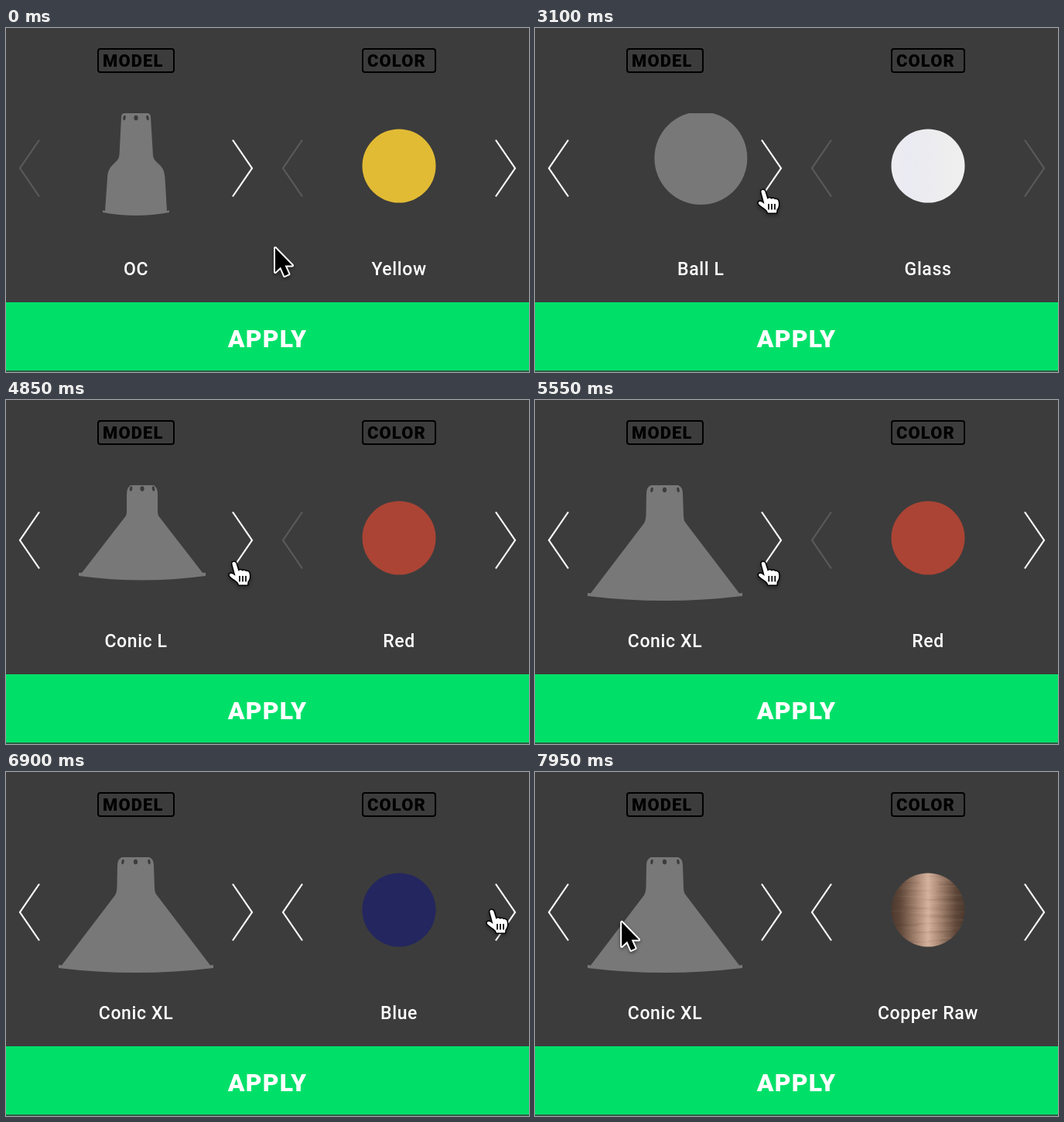
Recreate the animation shown at these times as an HTML page with a canvas. Size 676x444 px, loop 8000 ms.

```html
<!DOCTYPE html>
<html lang="en">
<head>
<meta charset="utf-8">
<title>Lamp picker</title>
<style>
  html, body { margin: 0; width: 100%; height: 100%; overflow: hidden; background: #3c3c3c; }
  canvas { display: block; }
</style>
</head>
<body>
<canvas id="stage" width="676" height="444"></canvas>
<script>
const ctx = document.getElementById('stage').getContext('2d');
const LOOP = 8000, SLIDE = 450, PANEL = 338;
const BG = '#3c3c3c', SHADE = '#787878', DIM = '#5a5a5a';
const modelClicks = [2845, 3758, 4408, 5055];
const colorClicks = [6397, 7139];
const rings = [[6340, 6540], [7080, 7240]];

// Cursor moves: start, end, target x, target y
const cursorStart = [348, 284];
const cursorMoves = [
  [1850, 2440, 294, 221],
  [2480, 2700, 295, 210],
  [5520, 6200, 628, 179],
  [7380, 7970, 112, 194]
];

const shade = (outline, holes, y) => ({ path: new Path2D(outline), holes, y });
const ball = (cy, r) => {
  const path = new Path2D();
  path.arc(168, cy, r, 0, Math.PI * 2);
  return { path, holes: [] };
};

const models = [
  { name: 'OC', ...shade(`M154 110H182Q187 110 187 115L190 164C191 176 205 174 205.500 194L208 236
    L211 235.500V238Q168 246 125 238V235.500L128 236L131 194C132 174 145 176 146.500 164L149 115Q149 110 154 110Z`,
    [153, 168, 183], 116) },
  { name: 'Ball L', ...ball(168, 60) },
  { name: 'Ball XL', ...ball(184, 77) },
  { name: 'Conic L', ...shade(`M161 110H191Q196 113 196 122V145Q196 149 199 152L254 223L258 223V227
    Q176 238 94 227V223L98 223L153 152Q156 149 156 145V122Q156 113 161 110Z`, [161.5, 176, 190.5], 114.5) },
  { name: 'Conic XL', ...shade(`M150 110H185Q191 112 191 121L192 149Q192 156 195 159L264 249.500L268 249V253
    Q168 265 68 253V249L72 249.500L141 159Q143 156 143.500 149L144 121Q144 112 150 110Z`, [151, 167.5, 185], 116) }
];

const acrossDisc = stops => {
  const g = ctx.createLinearGradient(460, 0, 556, 0);
  stops.forEach((c, i) => g.addColorStop(i / (stops.length - 1), c));
  return g;
};
const glass = { name: 'Glass', fill: acrossDisc(['#ececf0', '#eaeaf2', '#ececf0', '#eeeeee', '#efeff0']) };
const copper = {
  name: 'Copper Raw', brushed: true,
  fill: acrossDisc(['#4b382e', '#5f4739', '#876a58', '#b08e7a', '#d3b19d', '#b08e7a', '#876a58', '#5f4739', '#4b382e'])
};
const conicColors = [{ name: 'Red', fill: '#ab4435' }, { name: 'Blue', fill: '#24265f' }, copper];

const clamp = v => Math.min(1, Math.max(0, v));
const smooth = u => u * u * u * (u * (6 * u - 15) + 10);

// CSS "ease": cubic-bezier(.25, .1, .25, 1)
function ease(x) {
  if (x <= 0 || x >= 1) return clamp(x);
  const bezier = (a, b, s) => 3 * a * s * (1 - s) ** 2 + 3 * b * s * s * (1 - s) + s ** 3;
  let lo = 0, hi = 1;
  for (let i = 0; i < 24; i++) {
    const mid = (lo + hi) / 2;
    if (bezier(.25, .25, mid) < x) lo = mid; else hi = mid;
  }
  return bezier(.1, 1, lo);
}

const slidePosition = (clicks, t) => clicks.reduce((sum, at) => sum + ease((t - at) / SLIDE), 0);
const clickCount = (clicks, t) => clicks.filter(at => t >= at).length;

function text(str, x, y, font, color, spacing = 0, align = 'center') {
  ctx.font = `${font} Roboto, sans-serif`;
  ctx.letterSpacing = spacing + 'px';
  ctx.textAlign = align;
  ctx.fillStyle = color;
  ctx.fillText(str, x, y);
}

const caption = str => text(str, 0, 318.5, '500 23px', '#fff', .6);

function heading(str, x, width) {
  ctx.strokeStyle = '#000';
  ctx.lineWidth = 2;
  ctx.beginPath();
  ctx.roundRect(x + 1, 27, width - 2, 30, 3);
  ctx.stroke();
  text(str, x + 7, 50, '900 22px', '#000', 1.1, 'left');
}

function chevron(x, direction, active) {
  ctx.strokeStyle = active ? '#fff' : DIM;
  ctx.lineWidth = 2.2;
  ctx.beginPath();
  ctx.moveTo(x, 144.5);
  ctx.lineTo(x + 25 * direction, 181);
  ctx.lineTo(x, 217.5);
  ctx.stroke();
}

function drawModel(model) {
  ctx.fillStyle = SHADE;
  ctx.fill(model.path);
  ctx.fillStyle = BG;
  model.holes.forEach((x, i) => {
    ctx.beginPath();
    ctx.ellipse(x, model.y, i === 1 ? 2.6 : 1.7, 3.2, (1 - i) * .15, 0, Math.PI * 2);
    ctx.fill();
  });
  ctx.translate(168, 0);
  caption(model.name);
}

function drawColor(color) {
  ctx.save();
  ctx.beginPath();
  ctx.arc(508, 178, 47.5, 0, Math.PI * 2);
  ctx.fillStyle = color.fill;
  ctx.fill();
  if (color.brushed) {
    ctx.clip();
    for (let i = 0; i < 70; i++) {
      const r = Math.abs(Math.sin(i * 91.7) * 437.5) % 1;
      ctx.fillStyle = i % 2 ? 'rgba(255,225,200,.05)' : 'rgba(40,20,10,.07)';
      ctx.fillRect(455 + r * 70, 131 + (i * 37 % 95), 20 + r * 45, 1);
    }
  }
  ctx.restore();
  ctx.translate(508, 0);
  caption(color.name);
}

function carousel(items, position, left, draw) {
  ctx.save();
  ctx.beginPath();
  ctx.rect(left, 110, PANEL, 240);
  ctx.clip();
  items.forEach((item, i) => {
    const offset = (i - position) * PANEL;
    if (Math.abs(offset) >= PANEL) return;
    ctx.save();
    ctx.translate(offset, 0);
    draw(item);
    ctx.restore();
  });
  ctx.restore();
}

const arrow = new Path2D('M0 0V31L7 24.500L12 36L17.500 33.500L12.500 22.500H22Z');
const hand = new Path2D(`M-2.500 2C-3.500-1.500 1.500-2 2.500 1.500L5.500 11C6.500 9 10 9 10.500 11C11.500 9.500 14.500 10 15 11.500
  C16 10.500 19 11.500 19.500 13.500C20.500 18 20 21.500 17.500 24.500L17 28.500H6L5 26C2 22.500-3 20.500-5.500 17.500C-7.500 14.500-4.500 13-2 14.500L1.500 17Z`);
const knuckles = new Path2D('M7 17V24.500M11 17V24.500M15 17V24.500');

function cursorAt(t) {
  let [x, y] = cursorStart;
  for (const [start, end, tx, ty] of cursorMoves) {
    const k = smooth(clamp((t - start) / (end - start)));
    x += (tx - x) * k;
    y += (ty - y) * k;
  }
  return [x, y];
}

function drawCursor(t) {
  const [x, y] = cursorAt(t);
  const overNext = y > 128 && y < 228 && (Math.abs(x - 306) < 22 || Math.abs(x - 646) < 22);
  ctx.save();
  ctx.translate(x, y);
  if (rings.some(([from, to]) => t >= from && t < to)) {
    for (const [color, width] of [['#fff', 6.6], ['#000', 3.8]]) {
      ctx.beginPath();
      ctx.arc(2, -1, 60, 0, Math.PI * 2);
      ctx.strokeStyle = color;
      ctx.lineWidth = width;
      ctx.stroke();
    }
  }
  ctx.lineJoin = 'round';
  ctx.lineWidth = overNext ? 3 : 4;
  ctx.strokeStyle = overNext ? '#000' : '#fff';
  ctx.shadowColor = 'rgba(0,0,0,.45)';
  ctx.shadowBlur = 4;
  ctx.shadowOffsetY = 2;
  const shape = overNext ? hand : arrow;
  ctx.stroke(shape);
  ctx.shadowColor = 'transparent';
  ctx.fillStyle = overNext ? '#fff' : '#000';
  ctx.fill(shape);
  if (overNext) {
    ctx.lineWidth = 1.7;
    ctx.stroke(knuckles);
  }
  ctx.restore();
}

function render(t) {
  const modelIndex = clickCount(modelClicks, t);
  const colors = modelIndex === 0 ? [{ name: 'Yellow', fill: '#e2bb34' }] : modelIndex < 3 ? [glass] : conicColors;

  ctx.fillStyle = BG;
  ctx.fillRect(0, 0, 676, 444);
  heading('MODEL', 118, 100);
  heading('COLOR', 460, 96);

  carousel(models, slidePosition(modelClicks, t), 0, drawModel);
  carousel(colors, slidePosition(colorClicks, t), PANEL, drawColor);

  chevron(43, -1, modelIndex > 0);
  chevron(293, 1, true);
  chevron(383, -1, clickCount(colorClicks, t) > 0);
  chevron(633, 1, colors[0] !== glass);

  ctx.fillStyle = '#00e069';
  ctx.fillRect(0, 354, 676, 88);
  ctx.fillStyle = '#2a6145';
  ctx.fillRect(0, 442, 676, 2);
  text('APPLY', 338, 412, '900 32px', '#fff', 1.2);
  drawCursor(t);
}

const begin = performance.now();
function tick() {
  render((performance.now() - begin) % LOOP);
  requestAnimationFrame(tick);
}
tick();
</script>
</body>
</html>
```
